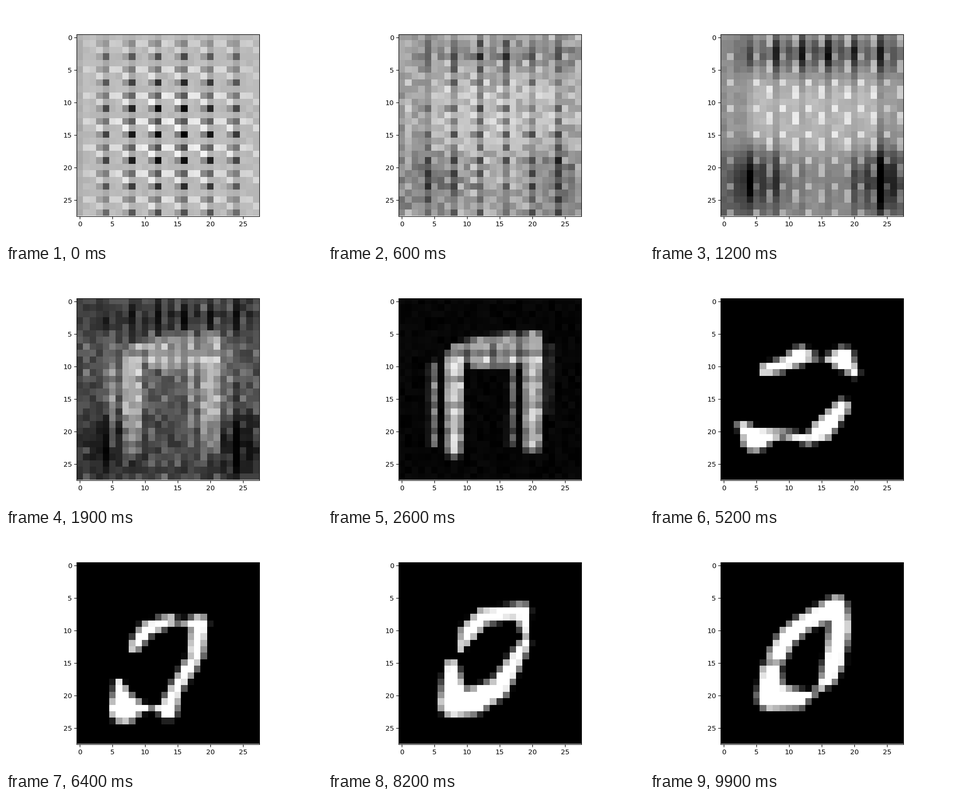
Write a matplotlib script that moves like this. It is 600x450 px and loops after 10000 ms.

```python
import numpy as np
import matplotlib.pyplot as plt
from matplotlib.animation import FuncAnimation

N, FRAMES = 28, 100
rng = np.random.default_rng(4)
r, c = np.mgrid[:N, :N]
rm, cm = r % 4, c % 4
grain = rng.uniform(-1, 1, (N, N))
phase = rng.uniform(0, 2 * np.pi, (N, N))
speed = rng.uniform(0.5, 1.3, (N, N))
drift = rng.uniform(0, 2 * np.pi, (2, 6, 3))


def bump(y, x, sy, sx):
    return np.exp(-((r - y) / sy) ** 2 - ((c - x) / sx) ** 2)


def stroke(points):
    """Soft line through (x, y, half width) points."""
    out = np.zeros((N, N))
    for (x0, y0, w0), (x1, y1, w1) in zip(points, points[1:]):
        dx, dy = x1 - x0, y1 - y0
        t = ((c - x0) * dx + (r - y0) * dy) / (dx * dx + dy * dy + 1e-9)
        t = np.clip(t, 0, 1)
        gap = np.hypot(c - x0 - t * dx, r - y0 - t * dy)
        out = np.maximum(out, np.clip(w0 + t * (w1 - w0) - gap + 0.5, 0, 1))
    return out


def lattice():
    env = bump(15, 14, 12.6, 12.6)
    odd, inner = r % 2 == 1, c > 2
    img = 0.73 + 0.025 * grain - 0.05 * (cm == 0)
    img -= ((cm == 0) & (rm == 3) & inner) * (0.17 + 0.52 * env)
    img -= ((cm == 0) & (rm == 1) & inner) * (0.06 + 0.32 * env)
    img -= ((cm == 3) & odd & inner & (c < 27)) * (0.05 + 0.18 * env)
    img += ((rm == 1) & ((cm == 1) | (cm == 2))) * (0.04 + 0.17 * env)
    img += ((rm == 2) & (cm == 3) & inner) * (0.05 + 0.2 * env)
    return np.clip(img, 0, 1)


def haze():
    dark = bump(2.5, 14, 3.4, 18) + bump(22, 4.5, 5, 4.5) + bump(22, 24, 5, 4)
    dark *= np.tanh(c / 3)
    img = 0.72 - 0.42 * dark + 0.035 * grain
    img -= 0.13 * (c < 4) + 0.1 * (c > 23)
    img -= 0.17 / (1 + np.exp(18 - r))
    img -= (cm == 0) * (0.05 + 0.2 * dark)
    img += (c % 2 == 1) * 0.12 * dark
    img += ((cm == 1) & (rm == 3)) * 0.18
    img += ((cm == 3) & (rm < 2) & (c > 4)) * 0.18
    return np.clip(img, 0, 1)


def legs():
    strokes = [
        (0.85, [(8, 9, 1.3), (8, 23, 1)]),
        (0.75, [(20, 6, 1.3), (20, 22, 1.2)]),
        (0.6, [(8.5, 7.5, 1), (12, 8, 2.4), (17, 7.5, 2.5)]),
        (0.45, [(4.9, 10, 0.6), (4.9, 22, 0.5)]),
        (0.4, [(17, 8, 0.5), (16.8, 22, 0.4)]),
        (0.25, [(22.5, 7, 0.6), (22.3, 17, 0.4)])]
    img = np.max([tone * stroke(points) for tone, points in strokes], axis=0)
    img *= 1 - 0.3 * (cm == 2) - 0.22 * (rm == 0)
    img *= 1 + 0.12 * grain + 0.35 * ((rm == 1) & (cm == 1))
    return np.clip(img + 0.02 * (1 + grain), 0, 1)


# Upper and lower arc of the digit, six (x, y, half width) points each
bands = [(4.5, 9.5, .2), (7, 9.3, 1.4), (10.5, 9, 1.6),
         (14, 9.2, .2), (18.8, 9.5, 1.4), (23, 9.4, .4),
         (18.8, 18, 1.6), (15, 19.8, 1.7), (12, 20, .3),
         (6.5, 19.4, 1.5), (3, 19.8, .8), (-1, 20, .1)]
broken = [(8.3, 12.6, .8), (10.2, 9.9, 1.1), (13.8, 8.5, .8),
          (15.4, 8.7, .1), (18.3, 9, 1.3), (17.8, 13.5, 1.2),
          (17.2, 15, 1.1), (14.7, 19, .9), (13.5, 22.3, 1.4),
          (11, 22, 0), (6.8, 22, 2.3), (5.9, 18, .5)]
wide = [(8.8, 13.2, .3), (10.2, 10.3, 1.3), (12.5, 7.9, 1.2),
        (16, 7.4, 1), (18.4, 7.1, 1.2), (19, 10.8, .4),
        (18.8, 12.2, .8), (17, 15.3, 1.2), (14.8, 19, 1.5),
        (10.8, 21, 2), (7.9, 21.2, 2.2), (7.6, 15.6, 1)]
tall = [(8.2, 13.8, 1.4), (9.9, 10.8, 1.4), (12.5, 8.8, 1.3),
        (17.3, 6.3, 1.5), (17.8, 9.5, 1.6), (17.2, 13, 1.5),
        (17, 14.5, 1.6), (16.1, 17.2, 1.2), (14, 19.7, .2),
        (11.3, 20.6, 1.4), (7.2, 20.2, 2.1), (7.2, 16.4, 1.5)]


def digit(arcs):
    return np.maximum(stroke(arcs[0]), stroke(arcs[1]))


ARCS = [np.reshape(a, (2, 6, 3)) for a in (bands, broken, wide, tall)]
EARLY = [lattice(), haze(), legs(), digit(ARCS[0])]
EARLY_AT = [0, 12, 26, 41]
ARCS_AT = [41, 64, 82, 99]


def locate(times, i):
    """Index of the running stage and its progress from 0 to 1."""
    k = min(np.searchsorted(times, i, side="right") - 1, len(times) - 2)
    return k, (i - times[k]) / (times[k + 1] - times[k])


def cells(i):
    if i < ARCS_AT[0]:
        k, u = locate(EARLY_AT, i)
        mix = (1 - u) * EARLY[k] + u * EARLY[k + 1]
        flicker = np.sin(np.pi * u) * np.sin(speed * i + phase)
        return np.clip(mix + 0.35 * mix * (1 - mix) * flicker, 0, 1)
    k, u = locate(ARCS_AT, i)
    arcs = (1 - u) * ARCS[k] + u * ARCS[k + 1]
    return digit(arcs + 0.4 * np.sin(np.pi * u) * np.sin(0.7 * i + drift))


fig, ax = plt.subplots(figsize=(6.4, 4.8), dpi=93.75)
image = ax.imshow(cells(0), cmap="gray", vmin=0, vmax=1)


def update(i):
    image.set_data(cells(i))
    return [image]


anim = FuncAnimation(fig, update, frames=FRAMES, interval=100,
                     repeat=True, repeat_delay=0)
plt.show()
```
